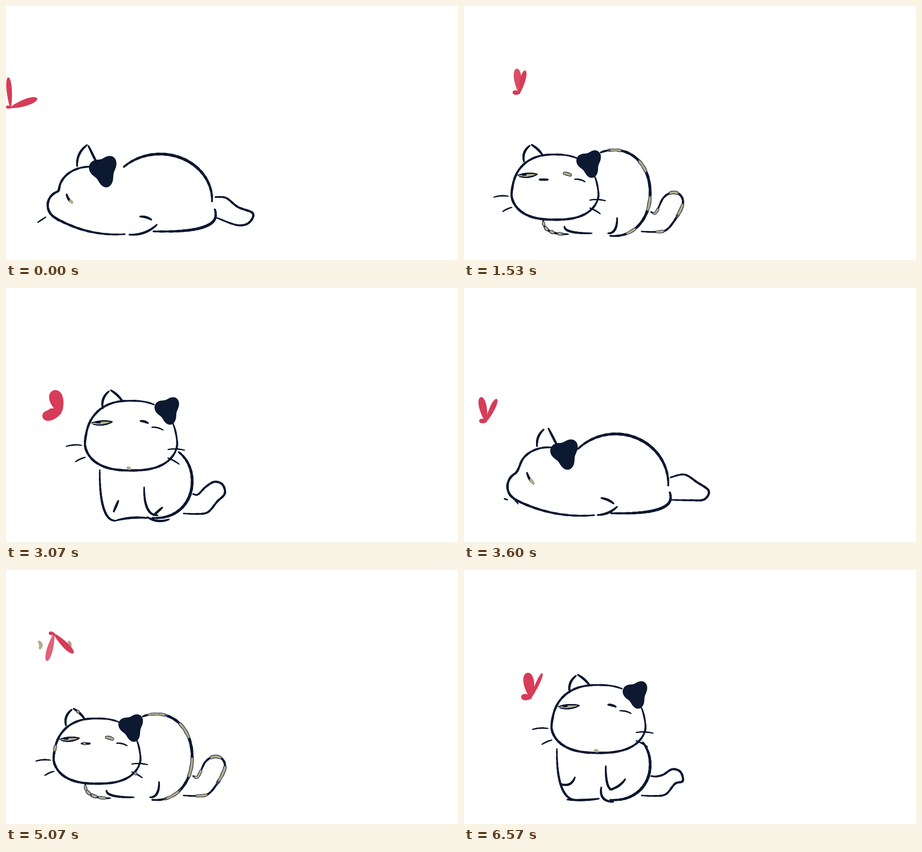
Recreate the animation shown at these times as an HTML page with a canvas. Size 998x561 px, loop 6.61 s.

```html
<!DOCTYPE html>
<html lang="en">
<head>
<meta charset="utf-8">
<title>Cat and butterfly</title>
<style>
html, body { margin: 0; width: 100%; height: 100%; overflow: hidden; background: #fff }
canvas { display: block }
</style>
</head>
<body>
<canvas id="stage" width="998" height="561"></canvas>
<script>
const ctx = document.getElementById('stage').getContext('2d');
const LOOP = 6610, PASS = 3340, N = 64;
const INK = '#0c1931', SHADE = '#444b58', OLIVE = '#b3ad8b', RED = '#d73c58';

const mix = (a, b, k) => a + (b - a) * k;
const steps = make => Array.from({length: N + 1}, (_, i) => make(i / N));

// Elliptic arc in degrees; a power below 1 makes it boxier
function arc(cx, cy, rx, ry, from, to, power = 1) {
  const round = v => Math.sign(v) * Math.abs(v) ** power;
  return steps(u => {
    const a = mix(from, to, u) * Math.PI / 180;
    return [cx + rx * round(Math.cos(a)), cy + ry * round(Math.sin(a))];
  });
}

// Line that swells sideways by "bend" at its middle
function bow(x0, y0, x1, y1, bend = 0) {
  const dx = x1 - x0, dy = y1 - y0, len = Math.hypot(dx, dy);
  return steps(u => {
    const off = 4 * u * (1 - u) * bend / len;
    return [x0 + dx * u + dy * off, y0 + dy * u - dx * off];
  });
}

// Leg: runs down, then turns into the ground
const hook = (x, top, bottom, run) => arc(x + run, top, run, bottom - top, 180, 90, .8);

// Smooth curve through points
function through(...p) {
  const at = i => p[Math.max(0, Math.min(p.length - 1, i))];
  return steps(u => {
    const i = Math.floor(u * (p.length - 1)), f = u * (p.length - 1) - i;
    const [a, b, c, d] = [at(i - 1), at(i), at(i + 1), at(i + 2)];
    return [0, 1].map(j => b[j] + f / 2 * (c[j] - a[j] +
      f * (2 * a[j] - 5 * b[j] + 4 * c[j] - d[j] + f * (3 * (b[j] - c[j]) + d[j] - a[j]))));
  });
}

// Joins curves into one, evenly spaced by length
function join(...parts) {
  const p = parts.flat(), sum = [0];
  for (let i = 1; i < p.length; i++)
    sum.push(sum[i - 1] + Math.hypot(p[i][0] - p[i - 1][0], p[i][1] - p[i - 1][1]));
  let i = 0;
  return steps(u => {
    const want = u * sum.at(-1);
    while (i < p.length - 2 && sum[i + 1] < want) i++;
    const f = (want - sum[i]) / (sum[i + 1] - sum[i] || 1);
    return [mix(p[i][0], p[i + 1][0], f), mix(p[i][1], p[i + 1][1], f)];
  });
}

// Black ear: a rounded triangle
const patch = (x, y, rx, ry) => arc(0, 0, 1, 1, 0, 360).map(([c, s]) => {
  const r = 1 + .2 * Math.cos(3 * (Math.atan2(s, c) - 3.4));
  return [x + rx * r * c, y + ry * r * s];
});

// Cat flat on its belly; s goes from tail down to tail raised
function lying(s, smear = {}) {
  const m = (a, b) => mix(a, b, s);
  return {smear, strokes: {
    head: join(
      arc(m(185, 190), m(408, 392), m(68, 61), m(53, 46), m(-75, -58), -180),
      arc(m(125, 134), m(440, 436), m(33, 34), m(32, 36), -110, -240),
      bow(m(109, 117), m(468, 467), m(262, 332), m(504, 498), m(-12, -14))),
    ear: patch(m(216, 236), m(363, 369), 28, m(32, 29)),
    earA: bow(m(157, 169), m(354, 342), m(179, 171), m(307, 322), m(7, 2)),
    earB: bow(m(182, 194), m(309, 312), m(203, 215), m(352, 349)),
    pupilA: bow(m(134, 148), m(416, 394), m(146, 167), m(435, 428), -2),
    _eye: bow(m(142, 156), m(430, 411), m(146, 166), m(434, 426)),
    whiskA: bow(m(70, 122), m(478, 443), m(88, 111), m(466, 471)),
    whiskB: bow(m(103, 110), m(462, 455), m(116, 126), m(475, 480)),
    back: arc(m(340, 325), m(428, 440), m(115, 119), m(101, 126), m(226, 222), 362),
    base: arc(m(345, 340), m(460, 464), m(118, 104), m(38, 33), -12, 96, .8),
    paw: bow(m(296, 316), m(465, 462), m(321, 347), m(472, 483), 2),
    foot: bow(m(272, 335), m(505, 495), m(333, 347), m(483, 483), m(-7, 0)),
    tail: through([m(462, 445), m(422, 412)], [m(486, 488), m(424, 391)], [m(512, 518), m(444, 402)],
      [m(545, 532), m(458, 430)], [m(536, 520), m(479, 446)], [m(510, 485), m(484, 442)], [m(466, 445), 468])
  }};
}

// Cat facing us; the face is laid out in units of the head's radii
function facing({x, y, rx, ry, ear, body, from, tail, nose, legs, smear = {}}) {
  const face = (u, v) => [x + u * rx, y + v * ry];
  const dash = (u0, v0, u1, v1, bend) => bow(...face(u0, v0), ...face(u1, v1), bend);
  const strokes = {
    _eye: dash(-.77, -.37, -.46, -.38),
    head: join(arc(0, 0, 1, 1, -60, -382, .8).map(([u, v]) => face(u * (1 - .13 * Math.max(0, .3 - v)), v))),
    ear: patch(...face(.78, -.74), 25, 28),
    earA: dash(ear, -.78, ear + .13, -1.27, 6),
    earB: dash(ear + .17, -1.3, ear + .42, -.98, 2),
    lidA: dash(-.84, -.36, -.4, -.4, 3),
    lidC: dash(-.81, -.33, -.4, -.39, -4),
    pupilA: dash(-.74, -.39, -.66, -.38),
    pupilB: dash(.2, -.42, .36, -.36, 1),
    lidB: dash(.44, -.24, .68, -.16, 2),
    whiskA: dash(-1.38, .31, -1.05, .28, 2),
    whiskC: dash(-1.18, .75, -.97, .62, 1),
    whiskB: dash(.78, .4, 1.14, .42, 2),
    whiskD: dash(.78, .64, 1.02, .82, 1),
    back: arc(331, body, 80, 508 - body, from, 95, .95),
    tail: through([413, 455], [424, 456], [440, tail + 12], [460, tail], [478, tail + 6], [483, tail + 26],
      [466, 472], [446, 495], [422, 499], [392, 498])
  };
  if (nose) strokes.nose = dash(-.35, -.23, -.16, -.23);
  else strokes._chin = dash(-.07, .92, -.02, .95);
  legs.forEach((leg, i) => strokes['leg' + i] = leg);
  return {strokes, smear};
}

const rest = lying(1);
const crouch = facing({
  x: 201, y: 400, rx: 98, ry: 72, ear: -.7, body: 413, from: -110, tail: 412, nose: true,
  legs: [hook(175, 474, 504, 55), hook(222, 487, 502, 60), hook(338, 468, 502, -20)],
  smear: {back: .45, tail: .4, leg0: .5, pupilB: .5}
});
const turning = facing({
  x: 236, y: 358, rx: 102, ry: 78, ear: -.66, body: 417, from: -78, tail: 418, nose: true,
  legs: [hook(188, 435, 502, 60), hook(232, 465, 503, 53), hook(341, 475, 508, -33), bow(295, 470, 295, 507, -2)],
  smear: {head: .85, tail: .7, earB: .6, nose: .4, whiskD: .6}
});
const sitting = facing({
  x: 276, y: 326, rx: 104, ry: 77, ear: -.6, body: 427, from: -52, tail: 428,
  legs: [hook(207, 402, 514, 36), bow(245, 513, 312, 508, 3), hook(305, 440, 502, 30),
    bow(312, 506, 360, 511, -6), bow(238, 494, 248, 470), bow(326, 502, 345, 485)]
});
const upright = facing({
  x: 297, y: 329, rx: 106, ry: 75, ear: -.6, body: 430, from: -38, tail: 440,
  legs: [hook(205, 395, 508, 45), bow(228, 507, 298, 505, -2), hook(313, 433, 485, 15),
    bow(303, 480, 330, 512, -12), bow(212, 472, 245, 458, -9), bow(322, 485, 356, 462, -4)]
});
const clean = p => ({...p, smear: {}});

const cat = [false, true].map(again => [
  [0, lying(0)],
  ...(again ? [[720, rest], [830, lying(1, {back: .4, base: .4, tail: .3, head: .15})], [930, rest]] : [[830, rest]]),
  [1000, rest], [1350, clean(crouch)], [1730, crouch],
  [2170, turning], [3070, sitting], [3230, upright], [PASS, upright]
]);

// time, body x and y, then reach x, reach y and half width of each wing
const open = [-12, -54, 10, 25, -50, 7];
const flight = [
  [0, 10, 224, -5, -67, 7, 59, -20, 9],
  [130, 16, 291, ...open],
  [420, 88, 300, ...open],
  [830, 162, 310, -16, -56, 15, 26, -60, 6],
  [1250, 140, 235, ...open],
  [1600, 118, 182, ...open],
  [1730, 106, 141, -16, 60, 8, 43, 43, 8],
  [2170, 104, 186, -30, -58, 10, 23, -58, 7],
  [2600, 88, 215, ...open],
  [3070, 120, 276, -15, -50, 18, -40, 9, 14],
  [3230, 148, 282, -8, -55, 14, 25, -54, 5],
  [PASS, 148, 282, -8, -55, 14, 25, -54, 5]
];

function span(keys, t) {
  let i = 0;
  while (i < keys.length - 2 && t >= keys[i + 1][0]) i++;
  const [a, b] = [keys[i], keys[i + 1]];
  return [a, b, (t - a[0]) / (b[0] - a[0])];
}

// Tapered stroke; "cover" below 1 leaves it in patches
function brush(pts, width, color, cover = 1) {
  ctx.strokeStyle = color;
  for (let i = 0; i < N; i++) {
    if (.5 + .5 * Math.sin(i * .4 + pts.length) > cover) continue;
    const swell = .6 + .4 * Math.sin(Math.PI * (i + .5) / N) ** .6;
    ctx.lineWidth = width * swell + width * .08 * Math.sin(i * 1.7);
    ctx.beginPath();
    ctx.moveTo(...pts[i]);
    ctx.lineTo(...pts[i + 1]);
    ctx.stroke();
  }
}

function fill(pts, color) {
  ctx.fillStyle = color;
  ctx.beginPath();
  pts.forEach(p => ctx.lineTo(...p));
  ctx.fill();
}

function inkWidth(name) {
  if (/^(whisk|lid)/.test(name)) return 2.8;
  return {back: 6.2, head: 5.2, base: 6}[name] || 4.8;
}

// Draws the cat and returns how smeared it is
function drawCat(keys, t) {
  const [[, a], [, b], k] = span(keys, t);
  let most = 0;
  for (const name of new Set([...Object.keys(a.strokes), ...Object.keys(b.strokes)])) {
    const A = a.strokes[name], B = b.strokes[name];
    const pts = A && B ? A.map((p, i) => [mix(p[0], B[i][0], k), mix(p[1], B[i][1], k)]) : A || B;
    const size = A && B ? 1 : (A ? 1 - k : k) ** 2;
    if (size < .03) continue;
    if (name == 'ear') fill(pts, INK);
    else if (name[0] == '_') brush(pts, 6 * size, OLIVE);
    else brush(pts, inkWidth(name) * size, INK);
    const cover = mix(a.smear[name] || 0, b.smear[name] || 0, k);
    if (cover) {
      brush(pts, 8, SHADE, cover);
      brush(pts, 4.5, OLIVE, cover * .9);
    }
    most = Math.max(most, cover);
  }
  return Math.min(1, most * 2);
}

// Wing: an oval from the body to its tip, narrow at the body
const petal = (x, y, rx, ry, half) => arc(0, 0, 1, 1, 0, 360).map(([c, s]) => {
  const along = (1 - c) / 2, side = s * half * (.55 + .5 * along) / Math.hypot(rx, ry);
  return [x + rx * along - ry * side, y + ry * along + rx * side];
});

function drawButterfly(t, smear) {
  const [a, b, k] = span(flight, t);
  const beats = Math.round((b[0] - a[0]) / 170);
  const flap = 1 - .55 * Math.sin(Math.PI * beats * k) ** 2;
  const [, x, y, ax, ay, aw, bx, by, bw] = a.map((v, i) => mix(v, b[i], k));
  if (smear > .5) {
    const mid = y + (ay + by) / 4;
    for (const side of [-1, 1])
      brush(bow(x + side * 33, mid - 8, x + side * 31, mid + 6, 3), 7 * smear, OLIVE);
  }
  fill(petal(x, y, bx * flap, by, bw), RED);
  ctx.globalAlpha = 1 - .2 * smear;
  fill(petal(x, y, ax * flap, ay, aw), RED);
  ctx.globalAlpha = 1;
  fill(petal(x + 2, y, -aw * 1.7, -2, aw * .6), RED);
}

ctx.lineCap = 'round';
const start = performance.now();

function draw(now) {
  const t = Math.max(0, now - start) % LOOP, again = t >= PASS;
  const phase = again ? t - PASS : t;
  ctx.clearRect(0, 0, 998, 561);
  drawButterfly(phase, drawCat(cat[+again], phase));
  requestAnimationFrame(draw);
}
draw(start);
</script>
</body>
</html>
```
